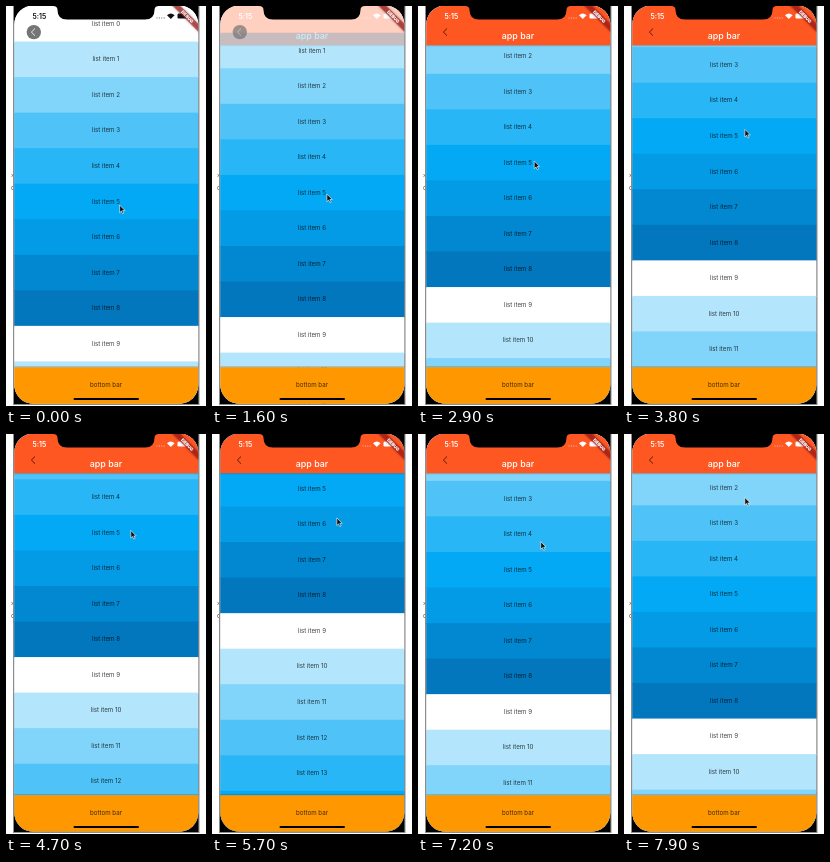
An HTML page that plays this animation: 200 by 400 pixels, repeating every 8000 ms.

```html
<!DOCTYPE html>
<html lang="en">
<head>
<meta charset="utf-8">
<title>Scrolling list with fading app bar</title>
<style>
  html, body { margin: 0; width: 100%; height: 100%; overflow: hidden; background: #fff; }
  svg { display: block; width: 100vw; height: 100vh; }
  text { font-family: Inter, Roboto, sans-serif; font-size: 6.2px; fill: rgba(0, 0, 0, .74); }
  .center { text-anchor: middle; }
</style>
</head>
<body>
<svg viewBox="0 0 200 400">
  <defs>
    <clipPath id="screen"><rect x="8.3" y="-.5" width="184" height="398.3" rx="19"/></clipPath>
    <filter id="blur" x="-20%" y="-60%" width="140%" height="220%"><feGaussianBlur stdDeviation="1"/></filter>
    <path id="chevron" d="M29 22.5 25.4 26.1l3.6 3.6" fill="none" stroke-width=".85"/>
  </defs>

  <!-- Scraps of the window behind the phone -->
  <text x="5.1" y="171">›</text>
  <text x="5.1" y="184">c</text>

  <!-- Window edge and black corners -->
  <rect x="7" width="186.5" height="399" fill="#8c8c8c"/>
  <rect x="8" width="184.4" height="398" fill="#000"/>

  <g clip-path="url(#screen)">
    <rect width="200" height="400" fill="#fff"/>
    <g id="list"></g>

    <g id="bar">
      <rect width="200" height="39.3" fill="#ff5722"/>
      <rect y="39.3" width="200" height="1" opacity=".15"/>
      <text class="center" x="100" y="33" style="font-size:8.9px;font-weight:500;fill:#fff">app bar</text>
    </g>

    <rect y="360.2" width="200" height="1.2" opacity=".18"/>
    <rect y="361.2" width="200" height="40" fill="#ff9800"/>
    <text class="center" x="100" y="381.4">bottom bar</text>
    <rect x="67.5" y="392" width="65.5" height="2.1" rx="1.05"/>

    <g id="backDisc">
      <circle cx="27.8" cy="26.1" r="7.2" fill="#757575"/>
      <use href="#chevron" stroke="#fff"/>
    </g>
    <use id="backPlain" href="#chevron" stroke="rgba(0,0,0,.8)"/>

    <g id="status">
      <text x="26.5" y="12.8" style="font-size:7px;font-weight:600;fill:inherit">5:15</text>
      <g opacity=".45">
        <circle cx="151" cy="12" r=".7"/><circle cx="153.4" cy="12" r=".7"/>
        <circle cx="155.8" cy="12" r=".7"/><circle cx="158.2" cy="12" r=".7"/>
      </g>
      <path d="M161 9.2Q164.8 6 168.6 9.2L164.8 13Z"/>
      <rect x="171.5" y="7.6" width="10" height="5" rx="1.3"/>
      <rect x="182" y="9.2" width=".8" height="1.8" rx=".4"/>
    </g>

    <g transform="translate(192 0) rotate(45)">
      <rect x="-20" y="12.4" width="40" height="5.4" opacity=".4" filter="url(#blur)"/>
      <rect x="-20" y="12.4" width="40" height="5.4" fill="#b71c1c" opacity=".63"/>
      <text class="center" y="16.7" style="font-size:4.5px;font-weight:900;fill:#fff">DEBUG</text>
    </g>
  </g>

  <path d="M47 0Q51.5 0 51.5 4 51.5 13.5 61 13.5H139Q148.5 13.5 148.5 4 148.5 0 153 0Z"/>

  <path id="cursor" d="M0 0V7.6L1.8 6 3 8.7 4.3 8.1 3 5.5H5.4Z" fill="#111" stroke="#fff" stroke-width=".6"/>
</svg>

<script>
const LOOP = 8000, STEP = 100;
const ROW = 35.54, ROWS = 16, FADE = 31;
const COLORS = ['#fff', '#b3e5fc', '#81d4fa', '#4fc3f7', '#29b6f6', '#03a9f4', '#039be5', '#0288d1', '#0277bd'];

// time, scroll offset, pointer x, pointer y
const KEYS = [
  [0, 0, 113.6, 199],
  [600, 0, 113.6, 199],
  [1600, 8.8, 114.9, 188],
  [2900, 38.8, 116.2, 155],
  [4700, 96.8, 124.8, 96.4],
  [5700, 140.7, 124.8, 83.9],
  [6700, 79.8, 123.8, 124.4],
  [7900, 35.3, 120.8, 63.4]
];

const $ = id => document.getElementById(id);
const list = $('list');

// Each row reaches under the next one, so no seam shows between them
for (let i = 0; i < ROWS; i++) {
  const y = i * ROW;
  list.innerHTML += `<rect y="${y}" width="200" height="${ROW + 1}" fill="${COLORS[i % COLORS.length]}"/>
    <text class="center" x="100" y="${y + 19.8}">list item ${i}</text>`;
}

// Monotone cubic interpolation of one column of KEYS
function sample(col, t) {
  const last = KEYS.length - 1;
  let i = 0;
  while (i < last - 1 && t >= KEYS[i + 1][0]) i++;
  const slope = k => (KEYS[k + 1][col] - KEYS[k][col]) / (KEYS[k + 1][0] - KEYS[k][0]);
  const tangent = k => {
    if (k === 0) return slope(0);
    if (k === last) return slope(last - 1);
    const a = slope(k - 1), b = slope(k);
    return a * b > 0 ? 2 * a * b / (a + b) : 0;
  };
  const [a, b] = [KEYS[i], KEYS[i + 1]];
  const h = b[0] - a[0], u = (t - a[0]) / h, v = 1 - u;
  return a[col] * (1 + 2 * u) * v * v + b[col] * u * u * (3 - 2 * u)
    + h * u * v * (tangent(i) * v - tangent(i + 1) * u);
}

function draw(time) {
  const t = Math.floor(time % LOOP / STEP) * STEP;
  const scroll = sample(1, t);
  const alpha = Math.min(1, scroll / FADE);

  list.setAttribute('transform', `translate(0 ${-scroll})`);
  $('bar').setAttribute('opacity', alpha);
  $('backDisc').setAttribute('opacity', 1 - alpha);
  $('backPlain').setAttribute('opacity', alpha);
  $('status').setAttribute('fill', alpha > 0 ? '#fff' : '#111');
  $('cursor').setAttribute('transform', `translate(${sample(2, t)} ${sample(3, t)})`);
}

const start = performance.now();
function tick() {
  draw(performance.now() - start);
  requestAnimationFrame(tick);
}
tick();
</script>
</body>
</html>
```
